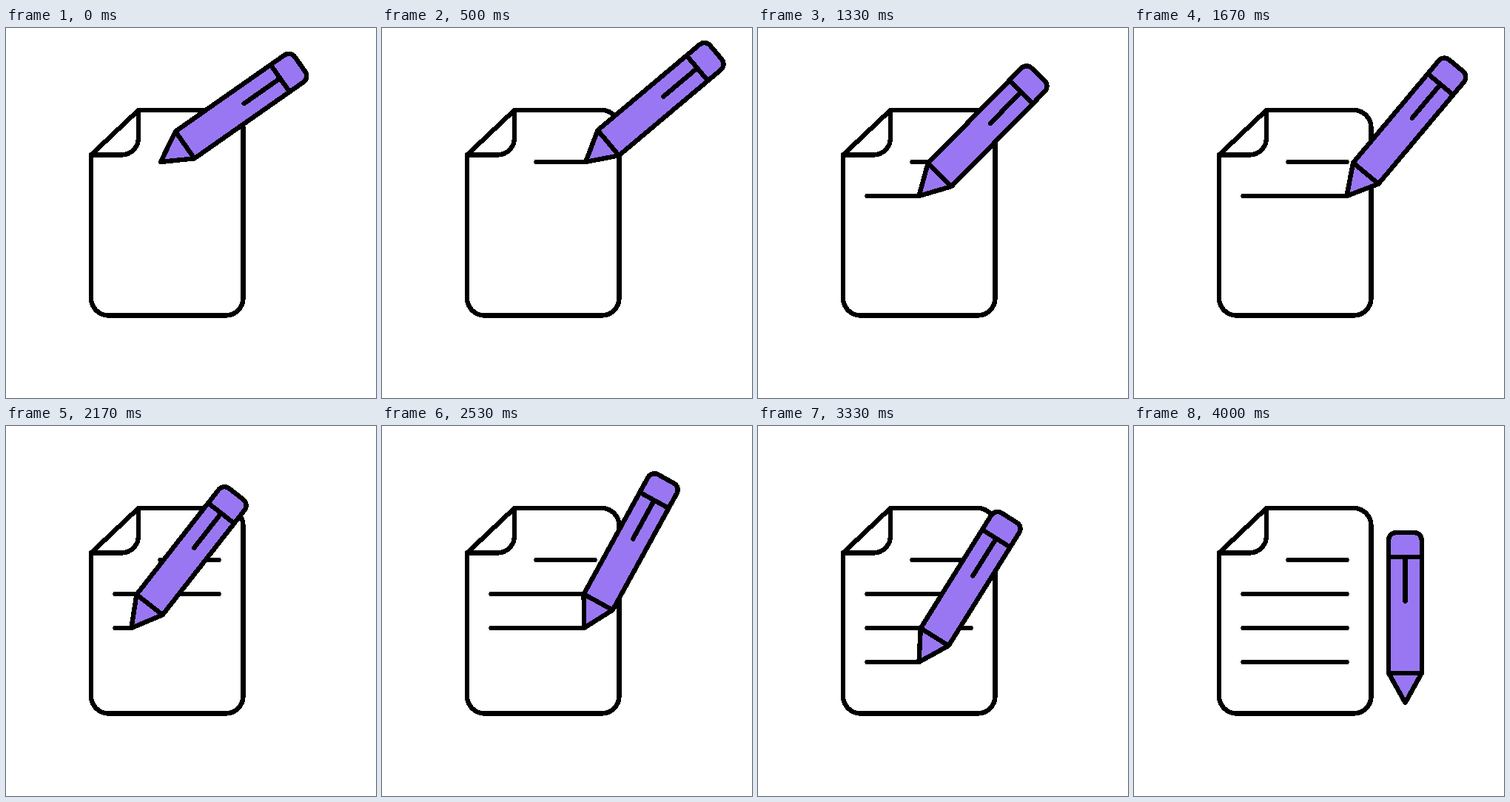
These frames come from a looping animation (500 px wide and 500 px high, 5 s). An HTML page:

```html
<!DOCTYPE html>
<html lang="en">
<head>
<meta charset="utf-8">
<title>Writing pencil</title>
<style>
  html, body { margin: 0; width: 100%; height: 100%; overflow: hidden; background: #fff; }
  svg {
    display: block; width: 100%; height: 100%;
    fill: none; stroke: #000; stroke-width: 6.4;
    stroke-linecap: round; stroke-linejoin: round;
    shape-rendering: crispEdges;
  }
  #body { fill: #9a77f2; }
</style>
</head>
<body>
<svg viewBox="0 0 500 500">
  <path d="M179 111H297A23.5 23.5 0 0 1 320.5 134.5V365A23.5 23.5 0 0 1 297 388.5H138.5A23.5 23.5 0 0 1 115 365V171.5Z"/>
  <path d="M179 111V148.5A23 23 0 0 1 156 171.5H115"/>
  <g id="lines"></g>
  <g id="pencil">
    <path id="body" d="M0 0L-22.3 -40V-220A10 10 0 0 1 -12.3 -230H12.3A10 10 0 0 1 22.3 -220V-40Z"/>
    <path d="M-22.3 -40H22.3M-22.3 -197H22.3M0 -197V-137.5"/>
  </g>
</svg>
<script>
const LOOP = 5000, FPS = 30, LAST = 120;
const START = 147.5, END = 287.5;

// Keyframes: frame, then the eased values.
const tipKeys = [
  [0, 209, 181], [20, END, 181],
  [30, START, 227], [50, END, 227],
  [60, START, 273], [80, END, 273],
  [90, START, 319], [110, END, 319],
  [LAST, 366.5, 374]
];
const tiltKeys = [
  [0, 55], [20, 49], [30, 49], [50, 40], [60, 40], [80, 27.5],
  [90, 32], [100, 32], [110, 35.5], [LAST, 0]
];

// Written lines: first frame, start x, y.
const strokes = [[0, 208.5, 181], [30, START, 227], [60, START, 273], [90, START, 319]];
const STROKE_FRAMES = 20;

const ease = u => u * u * (3 - 2 * u);
const mix = (a, b, u) => a + (b - a) * u;
const progress = (frame, from, to) =>
  ease(Math.min(1, Math.max(0, (frame - from) / (to - from))));

function sample(keys, frame) {
  const next = Math.max(1, keys.findIndex(key => key[0] >= frame));
  const [from, ...a] = keys[next - 1];
  const [to, ...b] = keys[next];
  const u = progress(frame, from, to);
  return a.map((value, i) => mix(value, b[i], u));
}

const pencil = document.getElementById('pencil');
const group = document.getElementById('lines');
const lines = strokes.map(() =>
  group.appendChild(document.createElementNS('http://www.w3.org/2000/svg', 'path')));

function draw(time) {
  // Frame starts are rounded to 10 ms, up to 3.4 ms late or early.
  const frame = Math.min(LAST, Math.floor((time % LOOP + 3.4) * FPS / 1000));
  const [x, y] = sample(tipKeys, frame);
  const [tilt] = sample(tiltKeys, frame);
  pencil.setAttribute('transform', `translate(${x} ${y}) rotate(${tilt})`);
  strokes.forEach(([from, x0, y0], i) => {
    const u = progress(frame, from, from + STROKE_FRAMES);
    lines[i].setAttribute('d', u > 0 ? `M${x0} ${y0}H${mix(x0, END, u)}` : '');
  });
}

const begin = performance.now();
function tick() {
  draw(performance.now() - begin);
  requestAnimationFrame(tick);
}
tick();
</script>
</body>
</html>
```
